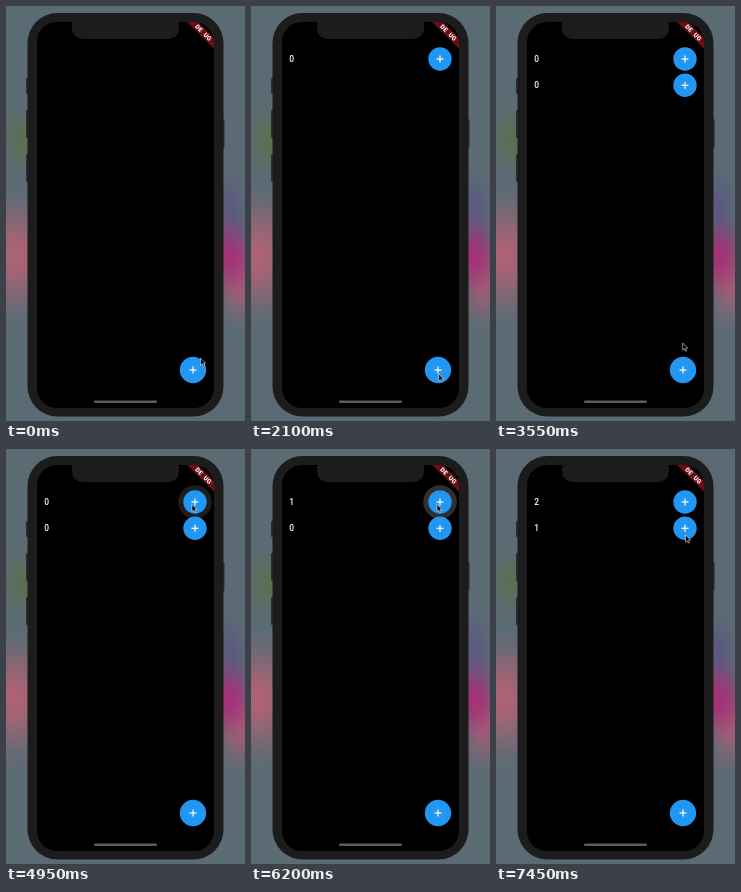
An HTML page with a canvas for the animation above (8000 ms loop, 239x415 px).

```html
<!DOCTYPE html>
<html lang="en">
<head>
<meta charset="utf-8">
<title>Counter list</title>
<style>
  html, body { margin: 0; width: 100%; height: 100%; overflow: hidden; background: #5c6c75; }
  canvas { display: block; width: 239px; height: 415px; }
</style>
</head>
<body>
<canvas id="stage"></canvas>
<script>
const W = 239, H = 415, LOOP = 8000, STEP = 50;
const BLUE = '#2196f3', SHELL = '#1c1c1c';
const RISE = 200, FADE = 150;          // touch highlight, in ms
const ADD_DELAY = 650, COUNT_DELAY = 200;

// Presses are [down, up] times.
const fabButton = { x: 187, y: 364, r: 13.2, presses: [[650, 1250], [2650, 3400]] };
const rowButtons = [
  { x: 189, y: 53, r: 11.7, presses: [[4860, 5400], [6050, 6400]] },
  { x: 189, y: 79.3, r: 11.7, presses: [[7200, 7300]] }
];
// Pointer tips and the time span of the move to each.
const moves = [
  { from: 50, to: 450, x: 187.7, y: 368 },
  { from: 3350, to: 3550, x: 186.7, y: 337 },
  { from: 3900, to: 4700, x: 186, y: 55.5 },
  { from: 6550, to: 7000, x: 189.5, y: 86 }
];

const canvas = document.getElementById('stage');
const g = canvas.getContext('2d');
const ratio = window.devicePixelRatio || 1;
canvas.width = Math.round(W * ratio);
canvas.height = Math.round(H * ratio);

const ramp = (t, from, span) => Math.min(1, Math.max(0, (t - from) / span));
const smooth = u => u * u * (3 - 2 * u);
const pressLevel = (t, [down, up]) => Math.min(ramp(t, down, RISE), 1 - ramp(t, up, FADE));
const level = (t, presses) => Math.max(...presses.map(p => pressLevel(t, p)));

function pointerAt(t) {
  const tip = { x: 194.5, y: 352 };
  for (const m of moves) {
    const u = smooth(ramp(t, m.from, m.to - m.from));
    tip.x += (m.x - tip.x) * u;
    tip.y += (m.y - tip.y) * u;
  }
  return tip;
}

function circle(x, y, r, fill) {
  g.beginPath();
  g.arc(x, y, r, 0, Math.PI * 2);
  g.fillStyle = fill;
  g.fill();
}

function box(x, y, w, h, r, fill) {
  g.beginPath();
  g.roundRect(x, y, w, h, r);
  g.fillStyle = fill;
  g.fill();
}

function glow(x, y, rx, ry, rgb, alpha) {
  g.save();
  g.translate(x, y);
  g.scale(rx, ry);
  const grad = g.createRadialGradient(0, 0, 0, 0, 0, 1);
  for (let u = 0; u <= 1; u += 0.25) {
    grad.addColorStop(u, `rgba(${rgb},${alpha * (1 - smooth(u))})`);
  }
  circle(0, 0, 1, grad);
  g.restore();
}

function plus(x, y) {
  g.fillStyle = '#fff';
  g.fillRect(x - 3.5, y - 0.6, 7, 1.2);
  g.fillRect(x - 0.6, y - 3.5, 1.2, 7);
}

function wallpaper() {
  g.fillStyle = '#5b6b74';
  g.fillRect(0, 0, W, H);
  glow(17, 134, 26, 40, '92,112,66', 0.7);
  glow(8, 250, 52, 72, '180,98,116', 0.95);
  glow(222, 205, 24, 50, '92,76,136', 0.6);
  glow(234, 278, 30, 50, '178,92,118', 0.8);
  glow(222, 250, 34, 46, '172,42,120', 0.9);
}

function phone() {
  [[72, 16], [104, 28], [148, 28]].forEach(([y, h]) => box(20, y, 4, h, 1, '#2b2e31'));
  box(215, 113, 3.5, 29, 1, '#2b2e31');
  box(21.5, 7, 196, 403.5, 30, SHELL);
  box(31, 16, 177, 386, 20, '#000');
}

function banner() {
  g.save();
  g.beginPath();
  g.roundRect(31, 16, 177, 386, 20);
  g.clip();
  g.translate(197, 26.7);
  g.rotate(Math.PI / 4);
  g.fillStyle = '#6c0e15';
  g.fillRect(-30, -4, 60, 7.6);
  g.font = '900 6.2px Roboto, Arial, sans-serif';
  g.textAlign = 'center';
  g.textBaseline = 'middle';
  g.fillStyle = '#fff';
  g.fillText('DE', -6, 0);
  g.fillText('UG', 6, 0);
  g.restore();
}

function notch() {
  box(66, 8, 107, 25, 10.5, SHELL);
}

function row(button, t) {
  const { x, y, r, presses } = button;
  circle(x, y, 16.8, `rgba(188,188,188,${level(t, presses) * 0.34})`);
  circle(x, y, r, BLUE);
  plus(x, y);
  const count = presses.filter(([down]) => t >= down + COUNT_DELAY).length;
  g.font = '500 8.4px Roboto, Arial, sans-serif';
  g.textAlign = 'center';
  g.textBaseline = 'alphabetic';
  g.fillStyle = '#fff';
  g.fillText(String(count), 40.7, y + 3);
}

function fab(t, tip) {
  const { x, y, r, presses } = fabButton;
  circle(x, y, r, BLUE);
  g.save();
  g.beginPath();
  g.arc(x, y, r, 0, Math.PI * 2);
  g.clip();
  for (const press of presses) {
    const amount = pressLevel(t, press);
    const spread = Math.max(0, t - press[0] - RISE) * 0.04;
    circle(x, y, r + 1, `rgba(196,196,196,${amount * 0.38})`);
    circle(tip.x, tip.y, spread, `rgba(200,200,200,${amount * 0.25})`);
  }
  g.restore();
  plus(x, y);
}

function pointer({ x, y }) {
  g.save();
  g.translate(x, y);
  const arrow = new Path2D('M0 0V7.2L1.7 5.7L2.8 8.2L4 7.7L2.9 5.2H5.1Z');
  g.fillStyle = '#000';
  g.fill(arrow);
  g.strokeStyle = 'rgba(255,255,255,0.75)';
  g.lineWidth = 0.7;
  g.stroke(arrow);
  g.restore();
}

function draw(t) {
  g.setTransform(ratio, 0, 0, ratio, 0, 0);
  const tip = pointerAt(t);
  wallpaper();
  phone();
  banner();
  notch();
  const added = fabButton.presses.filter(([down]) => t >= down + ADD_DELAY).length;
  rowButtons.slice(0, added).forEach(button => row(button, t));
  fab(t, tip);
  box(88, 394.6, 63, 2.4, 1.2, '#5c5c5c');
  pointer(tip);
}

const start = performance.now();
function tick(now) {
  const t = Math.max(0, now - start) % LOOP;
  draw(Math.floor(t / STEP) * STEP);
  requestAnimationFrame(tick);
}
draw(0);
requestAnimationFrame(tick);
</script>
</body>
</html>
```
